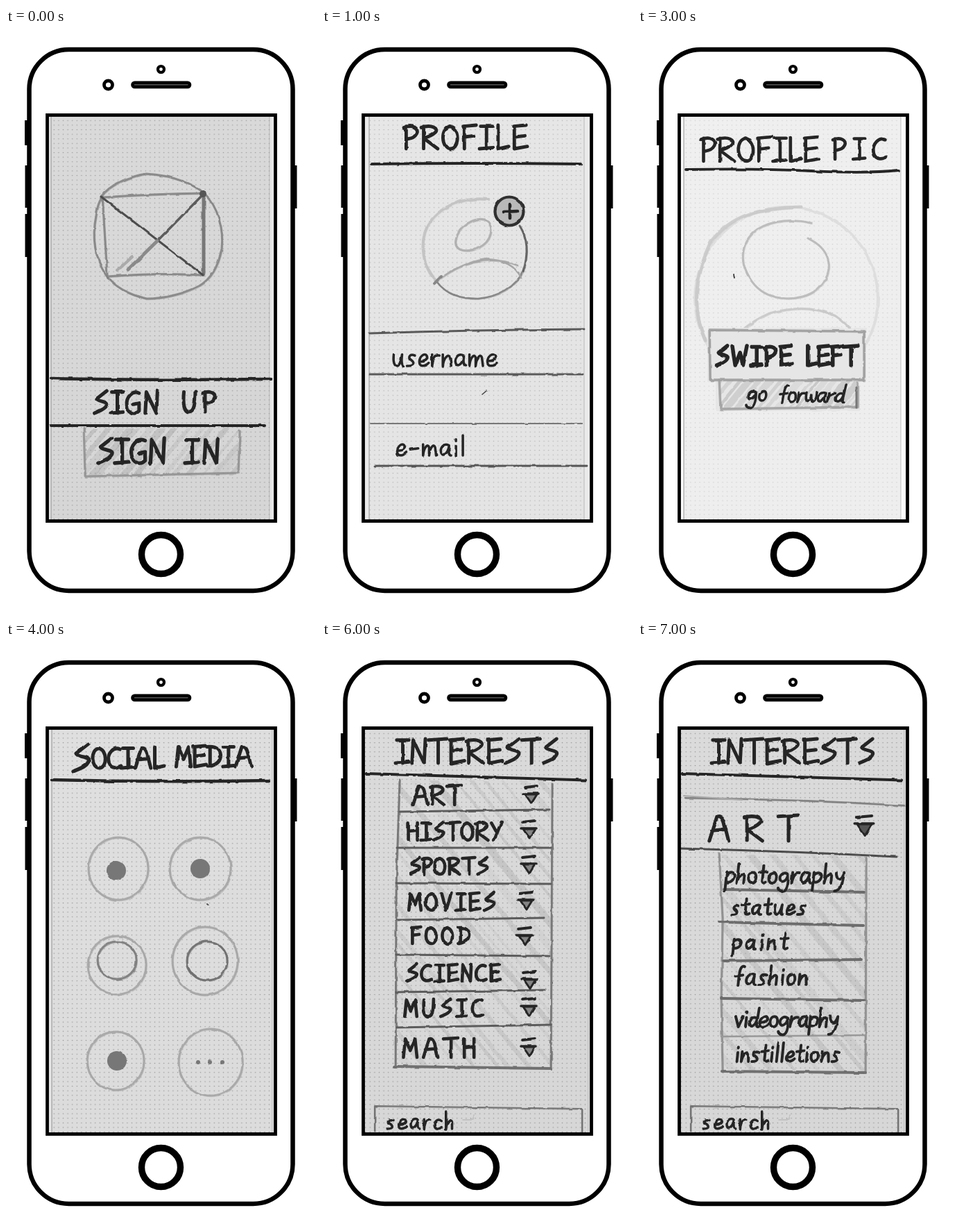
These frames come from a looping animation (447x843 px, 8 s). An HTML page:

```html
<!DOCTYPE html>
<html lang="en">
<head>
<meta charset="utf-8">
<title>Paper wireframe walkthrough</title>
<style>
html, body { margin: 0; width: 100%; height: 100%; overflow: hidden; background: #fff; }
svg { display: block; }
#stage { width: 100vw; height: 100vh; }
.ink { fill: none; stroke-linecap: round; stroke-linejoin: round; }
</style>
</head>
<body>
<svg id="stage" viewBox="0 0 447 843">
  <defs>
    <!-- pen letters: cap height 20, baseline at y = 20 -->
    <path id="A" data-w="17" d="M1 20L7 1C10 0 12 3 13 8L16 20M3 12L14 11"/>
    <path id="C" data-w="13" d="M12 2C6-1 0 6 1 13S7 21 13 18"/>
    <path id="D" data-w="14" d="M3 1V20M0 1C10 0 14 5 13 11S7 19 1 20"/>
    <path id="E" data-w="13" d="M2 1V20M1 1L12 0M2 10L11 9M2 20L13 18"/>
    <path id="F" data-w="12" d="M2 1V20M1 1L12 0M2 10L10 9"/>
    <path id="G" data-w="14" d="M12 2C6-1 0 6 1 13S8 22 12 18V11L7 12"/>
    <path id="H" data-w="14" d="M2 1V20M12 0V20M2 10L12 9"/>
    <path id="I" data-w="11" d="M1 1H11M6 1V20M0 20L11 19"/>
    <path id="L" data-w="11" d="M2 0V20L11 18"/>
    <path id="M" data-w="16" d="M1 20L3 1L8 13L13 1L15 20"/>
    <path id="N" data-w="13" d="M1 20L2 1L11 20L12 0"/>
    <path id="O" data-w="14" d="M7 1C-2 2-1 20 7 20S15 2 6 1"/>
    <path id="P" data-w="12" d="M2 1V20M0 2C8-1 13 3 11 7S6 11 2 12"/>
    <path id="R" data-w="15" d="M2 1V20M0 2C9-1 15 3 12 6S6 10 2 11L14 20"/>
    <path id="S" data-w="13" d="M12 0L3 7C4 10 14 9 12 13S5 18 1 20"/>
    <path id="T" data-w="15" d="M0 1L15 0M8 1V20"/>
    <path id="U" data-w="13" d="M1 1C0 12 1 20 6 20S12 12 12 0"/>
    <path id="V" data-w="13" d="M1 1L6 20L12 0"/>
    <path id="W" data-w="17" d="M1 1L4 20L9 7L12 20L16 0"/>
    <path id="Y" data-w="13" d="M1 1L6 10M12 0L4 20"/>
    <path id="a" data-w="11" d="M9 10C3 7 0 13 1 17S7 20 9 11C8 17 9 20 11 20"/>
    <path id="c" data-w="9" d="M9 11C4 7 0 13 1 17S6 21 9 18"/>
    <path id="d" data-w="11" d="M9 11C4 8 0 13 1 17S8 20 9 11M10 0L9 17Q9 20 11 20"/>
    <path id="e" data-w="10" d="M1 15C6 16 10 13 8 10S1 11 1 16S6 21 10 17"/>
    <path id="f" data-w="9" d="M9 1C5-1 4 5 4 12V21M0 11L8 10"/>
    <path id="g" data-w="11" d="M9 11C4 7 0 12 1 16S8 19 9 11C10 17 10 24 8 27S1 28 0 25"/>
    <path id="h" data-w="10" d="M1 0V20C2 11 7 8 8 12V20"/>
    <path id="i" data-w="4" d="M2 10V20M2 4V5"/>
    <path id="l" data-w="4" d="M2 0V20"/>
    <path id="m" data-w="15" d="M1 9V20C2 11 6 8 7 12V20C8 11 12 8 13 12L14 20"/>
    <path id="n" data-w="10" d="M1 9V20C2 11 7 8 8 12L9 20"/>
    <path id="o" data-w="10" d="M5 9C-1 9 0 20 5 20S10 9 5 9"/>
    <path id="p" data-w="10" d="M1 9V28M1 12C4 8 10 9 9 14S3 20 1 18"/>
    <path id="r" data-w="8" d="M1 9V20C2 12 4 9 8 10"/>
    <path id="s" data-w="9" d="M8 10C3 8 1 12 4 14S9 20 1 20"/>
    <path id="t" data-w="8" d="M4 2V18Q5 21 8 19M0 9L8 8"/>
    <path id="u" data-w="11" d="M1 9C0 17 2 20 4 20S8 16 9 9C8 17 9 20 11 20"/>
    <path id="v" data-w="10" d="M1 9L5 20L9 9"/>
    <path id="w" data-w="14" d="M1 9C1 17 3 21 5 19S7 14 7 12C8 20 10 21 12 18S13 11 13 9"/>
    <path id="y" data-w="10" d="M1 9C1 16 7 19 9 9C9 18 8 28 1 28"/>
    <path id="-" data-w="10" d="M1 14L9 13"/>

    <pattern id="dots" width="6.6" height="6.6" x="66" y="130" patternUnits="userSpaceOnUse">
      <circle cx="3.3" cy="3.3" r=".8" fill="#666"/>
    </pattern>
    <linearGradient id="shade" x2=".3" y2="1">
      <stop offset="0" stop-color="#fff" stop-opacity=".1"/>
      <stop offset="1" stop-color="#fff" stop-opacity="0"/>
    </linearGradient>
    <filter id="rough" filterUnits="userSpaceOnUse" x="55" y="120" width="340" height="595" color-interpolation-filters="sRGB">
      <feTurbulence type="fractalNoise" baseFrequency=".07" numOctaves="2" seed="4"/>
      <feDisplacementMap in="SourceGraphic" scale="3" xChannelSelector="R" yChannelSelector="G"/>
    </filter>
    <clipPath id="screen"><rect x="61" y="127" width="326" height="582"/></clipPath>
  </defs>

  <rect width="447" height="843" fill="#fff"/>
  <g id="scenes" clip-path="url(#screen)"></g>

  <g fill="none" stroke="#000">
    <rect x="33.5" y="31" width="380" height="780" rx="57" stroke-width="6.5"/>
    <rect x="59.5" y="125.5" width="329" height="585" stroke-width="4.8"/>
    <circle cx="223.5" cy="59.5" r="4.5" stroke-width="4.2"/>
    <circle cx="147.5" cy="82" r="6" stroke-width="4.8"/>
    <rect x="182.5" y="78.7" width="82.5" height="6.2" rx="3" fill="#555" stroke-width="4.6"/>
    <circle cx="223.5" cy="758.5" r="28" stroke-width="9.4"/>
    <path d="M31 133V169M31.5 198V259M31.5 268V330M415.5 198V260" stroke-width="8"/>
  </g>
</svg>
<script>
const INK = '#252525', PENCIL = '#808080';

let seed = 7;
const rnd = () => (seed = seed * 16807 % 2147483647) / 2147483647;

const stroke = (d, w = 4, color = INK, op = 1) =>
  `<path class="ink" d="${d}" stroke="${color}" stroke-width="${w}" opacity="${op}"/>`;

// Pencil: a main line with a lighter second pass beside it
const pencil = (d, w = 2.5, color = PENCIL) =>
  stroke(d, w, color, .85) +
  `<g transform="translate(1 1.2)">${stroke(d, w * .7, color, .4)}</g>`;

const oval = (cx, cy, rx, ry) =>
  `M${cx - rx} ${cy}a${rx} ${ry} 0 1 1 ${2 * rx} 0a${rx} ${ry} 0 1 1 ${-2 * rx} 0`;

// Hand-drawn parts share one uneven edge
const sketch = body => `<g filter="url(#rough)">${body}</g>`;

// A pen-written word from x1 to x2 on baseline y, with cap height h
function word(text, x1, x2, y, h, w = 4, lean = 0) {
  const k = h / 20;
  const widths = [...text].map(c => +document.getElementById(c).dataset.w);
  const gap = (x2 - x1 - k * widths.reduce((a, b) => a + b)) / (text.length - 1);
  let x = x1, out = '';
  [...text].forEach((c, i) => {
    out += `<use href="#${c}" transform="translate(${x} ${y}) skewX(${-lean}) scale(${k}) translate(0 -20)"/>`;
    x += widths[i] * k + gap;
  });
  return `<g class="ink" role="img" aria-label="${text}" stroke="${INK}" stroke-width="${w * 1.1 / k}">${out}</g>`;
}

// Slanted pencil shading, clipped to its box; dir -1 leans the other way
function hatch(x, y, w, h, step = 13, op = .25, dir = 1) {
  let out = '';
  for (let s = -h; s < w; s += step * (.6 + rnd()))
    out += stroke(`M${s} ${h}L${s + h * .9} ${-h * .1}`, 3 + rnd() * 8, '#8a8a8a', op * (.3 + rnd() * .8));
  const flip = dir < 0 ? `transform="translate(${w} 0) scale(-1 1)"` : '';
  return `<svg x="${x}" y="${y}" width="${w}" height="${h}"><g ${flip}>${out}</g></svg>`;
}

function paper(tone, dots, left, right, edge = '#e6e6e6') {
  const box = 'x="60" y="126" width="328" height="584"';
  return `<rect ${box} fill="${tone}"/><rect ${box} fill="url(#shade)"/>
    <rect ${box} fill="url(#dots)" opacity="${dots}"/>
    <rect x="60" y="126" width="${left - 60}" height="584" fill="${edge}"/>
    <rect x="${right}" y="126" width="${388 - right}" height="584" fill="${edge}"/>` +
    stroke(`M${left} 127V709`, 1.6, '#8c8c8c', .6) + stroke(`M${right} 127V709`, 1.2, '#999', .5);
}

const arrow = (x, y, k = 1, fill = '#858585') =>
  stroke(`M${x - 9 * k} ${y + 1}L${x + 9 * k} ${y - 1}`, 3.8) +
  stroke(`M${x - 11 * k} ${y + 10}H${x + 11 * k}`, 3.6) +
  `<path d="M${x - 8 * k} ${y + 11}H${x + 9 * k}L${x + k} ${y + 10 + 14 * k}Z" fill="${fill}" stroke="${INK}" stroke-width="3" stroke-linejoin="round"/>`;

const swipe = (x, y, w, h, inner, tone) =>
  `<rect x="${x - 3}" y="${y - 3}" width="${w + 6}" height="${h + 6}" fill="${tone}"/>
   <rect x="${inner - 5}" y="${y + h}" width="208" height="45" fill="${tone}"/>` +
  hatch(inner, y + h, 200, 42, 12, .3) +
  pencil(`M${x} ${y}L${x + w} ${y + 2}V${y + h}H${x + 1}Z`, 3.4, '#9a9a9a') +
  pencil(`M${inner} ${y + h}L${inner + 2} ${y + h + 42}L${inner + 200} ${y + h + 39}V${y + h + 4}`, 3.4, '#a0a0a0');

const rows = [
  ['ART', 130, 201, 236, 28, 301, 210], ['HISTORY', 122, 260, 287, 26, 298, 260],
  ['SPORTS', 126, 239, 336, 24, 298, 311], ['MOVIES', 124, 249, 388, 25, 294, 363],
  ['FOOD', 128, 213, 436, 24, 292, 414], ['SCIENCE', 122, 257, 490, 24, 299, 477],
  ['MUSIC', 118, 232, 541, 25, 298, 516], ['MATH', 116, 222, 600, 28, 298, 574]
];
const arts = [
  ['photography', 125, 297, 349, 28], ['statues', 134, 241, 394, 25], ['paint', 136, 215, 444, 26],
  ['fashion', 139, 244, 495, 27], ['videography', 138, 288, 556, 27], ['instilletions', 140, 290, 606, 26]
];

const scenes = {
  home: paper('#d6d6d6', .5, 65, 380) + sketch(
    pencil('M137 243C150 225 180 213 203 210C240 212 270 225 286 238C306 258 314 290 311 318C306 345 295 362 278 372C255 384 225 390 203 390C178 385 155 372 144 356C127 330 124 300 130 270C132 256 134 250 139 243', 3) +
    pencil('M139 244Q210 239 286 238M146 358Q220 352 285 356M139 243L146 358', 3) +
    stroke('M285 238V354', 5, '#777') + stroke('M137 243L284 356', 3, '#4c4c4c') +
    stroke('M286 238L218 307', 3.5, '#5c5c5c') + stroke('M218 307L176 348', 5, '#8a8a8a') +
    stroke('M160 350L182 330', 4, '#aaa') +
    `<circle cx="284" cy="239" r="5" fill="#555"/>` +
    stroke('M65 505Q200 508 381 506', 4.6) + stroke('M64 573H373', 4) +
    hatch(113, 577, 224, 68, 14, .3) + pencil('M112 577L114 646L335 641L337 580', 3, '#909090') +
    word('SIGN', 126, 220, 555, 32, 4.6) + word('UP', 255, 302, 553, 30, 4.6) +
    word('SIGN', 131, 230, 627, 36, 4.8) + word('IN', 258, 307, 627, 35, 4.8)),

  profile: paper('#e4e4e4', .36, 68, 378, '#eaeaea') + sketch(
    word('PROFILE', 118, 296, 174, 34, 4.4) + stroke('M71 196Q220 194 373 196', 4) +
    pencil('M165 365C145 345 140 310 152 285C170 255 205 243 240 247', 4, '#c0c0c0') +
    pencil('M165 365C180 385 200 390 225 390C255 387 280 373 290 350', 2.6, '#7a7a7a') +
    pencil('M290 350C297 328 298 305 285 285', 3, '#555') +
    pencil('M193 305C197 285 220 272 235 276C250 285 245 308 225 317C205 325 190 320 193 305', 3, '#aaa') +
    pencil('M165 365Q200 338 237 333Q275 334 287 360M190 348Q240 325 282 342', 2.4, '#a0a0a0') +
    stroke('M162 368L172 358', 4, '#888') +
    `<circle cx="270" cy="264" r="20.5" fill="#b9b9b9" stroke="#303030" stroke-width="4.2"/>` +
    stroke('M261 265L282 264M271 254V274', 4.6) +
    stroke('M68 440Q220 435 378 434', 2.8, '#5a5a5a') + stroke('M68 499H376', 2.8, '#5a5a5a') +
    stroke('M70 570H376', 2, '#777') + stroke('M75 631H382', 2.8, '#555') +
    word('username', 102, 252, 487, 30, 3.2) + word('e-mail', 107, 206, 616, 29, 3.2) +
    stroke('M232 528L238 523', 1.6, '#444')),

  pic: paper('#eeeeee', .22, 66, 379, '#fbfbfb') + sketch(
    word('PROFILE', 91, 261, 192, 35, 4.2) + word('PIC', 281, 358, 189, 31, 4.2) +
    stroke('M69 204Q170 202 250 206T376 205', 3.8) +
    stroke(oval(214, 390, 132, 132), 4, '#dedede') +
    pencil('M97 450C75 400 85 350 105 308C135 270 170 260 235 258', 5, '#c8c8c8') +
    pencil('M245 303C280 320 285 352 258 377C235 395 190 395 168 370C145 343 145 310 172 290C195 276 225 275 250 281', 3, '#b6b6b6') +
    pencil('M112 478Q145 430 190 411Q245 396 285 415Q315 435 325 470', 3.2, '#c6c6c6') +
    stroke('M138 356L139 360', 1.8, '#333')),

  left: sketch(swipe(103, 435, 223, 72, 117, '#e6e6e6') +
    word('SWIPE', 112, 222, 486, 28, 5) + word('LEFT', 242, 317, 486, 28, 5) +
    word('go', 157, 185, 537, 25, 3.2, 10) + word('forward', 203, 297, 539, 25, 3.2, 10) +
    stroke('M315 518V547', 3, '#777')),

  social: paper('#dcdcdc', .55, 66, 384) + sketch(
    word('S', 95, 120, 188, 40, 4.8) + word('OCIAL', 124, 228, 183, 30, 4.6) +
    word('MEDIA', 244, 355, 181, 30, 4.6) + stroke('M66 200Q220 204 379 201', 4.4) +
    [[162, 328, 43, 45], [280, 328, 44, 45], [160, 467, 42, 42], [287, 461, 47, 49], [158, 605, 41, 42], [295, 607, 46, 48]]
      .map(c => pencil(oval(...c), 3, '#a3a3a3')).join('') +
    [[159, 331], [280, 328], [160, 605]]
      .map(([x, y]) => `<circle cx="${x}" cy="${y}" r="14" fill="#777"/>`).join('') +
    pencil(oval(160, 460, 28, 27), 3, '#777') + pencil(oval(290, 461, 29, 28), 3, '#666') +
    [277, 294, 312].map(x => `<circle cx="${x}" cy="607" r="3" fill="#777"/>`).join('') +
    stroke('M290 379L292 381', 2, '#555')),

  right: sketch(swipe(99, 453, 248, 62, 123, '#e2e2e2') + stroke('M96.5 456V522', 2, '#f6f6f6') +
    word('SWIPE', 112, 217, 500, 29, 5) + word('RIGHT', 237, 337, 497, 27, 5) +
    word('go', 164, 191, 548, 25, 3.2, 10) + word('forward', 208, 305, 550, 25, 3.2, 10) +
    stroke('M320 525V555', 3, '#777')),

  topics: paper('#d7d7d7', .55, 61, 384, '#e2e2e2') + sketch(
    word('INTERESTS', 106, 340, 176, 35, 4.5) + stroke('M63 191Q220 196 380 200.5', 4.2) +
    pencil('M76 707V670L375 674V709', 2.2, '#666') + word('search', 93, 190, 703, 25, 3.2) +
    stroke('M203 690H219V683', 1.5, '#aaa', .6)),

  list: sketch(hatch(110, 201, 220, 414, 22, .22, -1) +
    pencil('M112 200L107 350L106 613M332 205L330 616', 2.8, '#6c6c6c') +
    stroke('M112 246L328 243M108 298H330M107 349L330 350M107 402L320 399M107 452L328 454M107 506L322 503M107 557L330 553', 3, '#5c5c5c') +
    stroke('M105 613L330 616', 4, '#707070') +
    rows.map(([t, a, b, y, h, x, ay]) => word(t, a, b, y, h, 4.2) + arrow(x, ay)).join('')),

  art: sketch(pencil('M68 226Q230 228 384 237', 2.6, '#777') + stroke('M66 223L150 229', 2, '#aaa') +
    word('ART', 101, 230, 288, 37, 4.6) + arrow(326, 253, 1.25, '#555') +
    stroke('M62 299Q220 303 373 311', 3, '#4c4c4c') +
    hatch(120, 308, 208, 312, 24, .2, -1) +
    pencil('M117 306L122 400L120 515L122 621M329 312L328 622', 3, '#8a8a8a') +
    stroke('M124 358L326 362M117 405L325 410M123 461L322 459M120 515L326 518', 3.8, '#6c6c6c') +
    stroke('M120 570L327 568', 2.6, '#999') + stroke('M121 620L328 622', 4, '#707070') +
    arts.map(a => word(...a, 3.6, 6)).join(''))
};

const host = document.getElementById('scenes');
host.innerHTML = Object.entries(scenes)
  .map(([name, body]) => `<g data-name="${name}">${body}</g>`).join('');
const groups = [...host.children];

// One entry per second
const steps = ['home', 'profile', 'pic', 'pic left', 'social', 'social right', 'topics list', 'topics art']
  .map(s => s.split(' '));
let last = -1;

function draw(ms) {
  const step = Math.floor(ms % 8000 / 1000);
  if (step === last) return;
  last = step;
  for (const g of groups)
    g.style.display = steps[step].includes(g.dataset.name) ? '' : 'none';
}

const start = performance.now();
function tick() {
  draw(performance.now() - start);
  requestAnimationFrame(tick);
}
tick();
</script>
</body>
</html>
```
